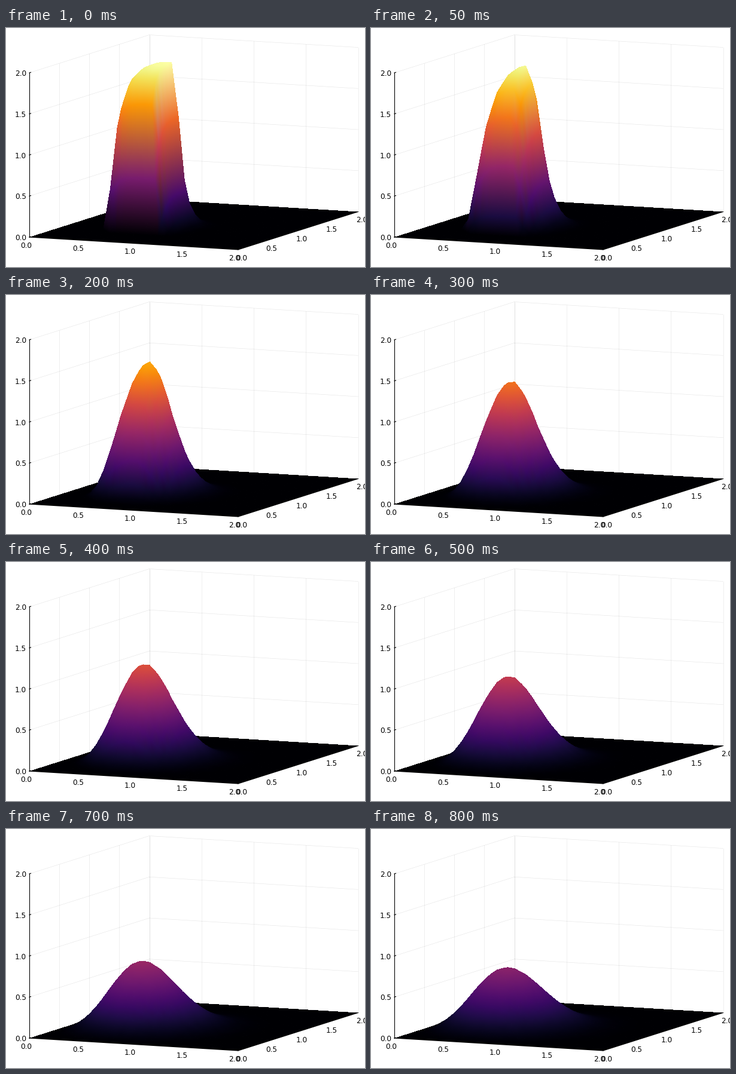
A matplotlib script that plays this animation: 600x400 px, repeating every 0.85 s.

```python
import numpy as np
import matplotlib
import matplotlib.pyplot as plt
from matplotlib.animation import FuncAnimation

W, H, DPI = 600, 400, 100
N = 31                 # grid points per side
FRAMES = 17
SIGMA = 0.25           # diffusion number of one step
PX = 72 / DPI          # one pixel in points

ORIGIN = np.array([39.0, 350.0])
EX = np.array([349.0, 21.0]) / 2
EY = np.array([200.5, -63.5]) / 2
EZ = np.array([0.0, -275.0]) / 2
INFERNO = matplotlib.colormaps["inferno"]
TICKS = np.arange(0, 2.1, 0.5)


def project(x, y, z):
    x, y, z = (np.asarray(a, float)[..., None] for a in (x, y, z))
    return ORIGIN + x * EX + y * EY + z * EZ


def diffuse(u):
    """One in-place sweep, so lower neighbours are already updated."""
    for i in range(1, N - 1):
        for j in range(1, N - 1):
            u[i, j] += SIGMA * (u[i - 1, j] + u[i + 1, j]
                                + u[i, j - 1] + u[i, j + 1] - 4 * u[i, j])


def fill_triangle(img, pts, cols):
    """Paint a triangle with linearly blended vertex colours."""
    (x0, y0), (x1, y1), (x2, y2) = pts
    area = (x1 - x0) * (y2 - y0) - (x2 - x0) * (y1 - y0)
    if abs(area) < 1e-9:
        return
    left, top = np.ceil(pts.min(axis=0) - 0.5).astype(int)
    right, bottom = np.floor(pts.max(axis=0) - 0.5).astype(int)
    if right < left or bottom < top:
        return
    px = np.arange(left, right + 1)[None, :] + 0.5
    py = np.arange(top, bottom + 1)[:, None] + 0.5
    b = ((px - x0) * (y2 - y0) - (x2 - x0) * (py - y0)) / area
    c = ((x1 - x0) * (py - y0) - (px - x0) * (y1 - y0)) / area
    a = 1 - b - c
    inside = (a >= -1e-9) & (b >= -1e-9) & (c >= -1e-9)
    weights = np.stack([a[inside], b[inside], c[inside]], axis=1)
    img[top:bottom + 1, left:right + 1][inside] = weights @ cols


def render(u):
    """Draw the surface from the far corner to the near one."""
    img = np.zeros((H, W, 4))
    grid = np.linspace(0, 2, N)
    x, y = np.meshgrid(grid, grid, indexing="ij")
    pts = project(x, y, u)
    cols = INFERNO(u / 2)
    for j in range(N - 2, -1, -1):
        for i in range(N - 1):
            upper = ([i, i + 1, i + 1], [j + 1, j + 1, j])
            lower = ([i, i + 1, i], [j, j, j + 1])
            for tri in (upper, lower):
                fill_triangle(img, pts[tri], cols[tri])
    return np.clip(img, 0, 1)


def simulate():
    x = np.linspace(0, 2, N)
    block = (x > 0.5) & (x < 0.99)
    u = 2.0 * np.outer(block, block)
    images = []
    for _ in range(FRAMES):
        diffuse(u)
        images.append(render(u))
    return images


fig = plt.figure(figsize=(W / DPI, H / DPI), dpi=DPI, facecolor="white")
ax = fig.add_axes([0, 0, 1, 1])
ax.axis("off")


def line(*corners, **style):
    p = np.array([project(*c) for c in corners])
    ax.plot(p[:, 0], p[:, 1], **style)


def label(x, y, value, **style):
    ax.text(x, y, f"{value:.1f}", fontsize=8.7, family="DejaVu Sans",
            color="black", va="center_baseline", **style)


grid_style = dict(color="black", alpha=0.1, lw=0.6 * PX, zorder=1)
axis_style = dict(color="black", lw=1.1 * PX, zorder=4)

for t in TICKS:
    line((0, t, 0), (0, t, 2), **grid_style)
    line((t, 2, 0), (t, 2, 2), **grid_style)
    line((0, 0, t), (0, 2, t), **grid_style)
    line((0, 2, t), (2, 2, t), **grid_style)

line((0, 0, 0), (2, 0, 0), **axis_style)
line((2, 0, 0), (2, 2, 0), **axis_style)
line((0, 0, 0), (0, 0, 2), **axis_style)

for k, t in enumerate(TICKS):
    line((0, 0, t), (0, 0.025, t), **axis_style)
    label(34, 350 - 68.75 * k, t, ha="right")
    label(33.4 + 87 * k, 362.5 + 5.3 * k, t, ha="center")
    label(394 + 50.1 * k, 384 - 16 * k, t, ha="center")

images = simulate()
surface = ax.imshow(images[0], extent=(0, W, H, 0), interpolation="nearest",
                    aspect="auto", zorder=2)
ax.set_xlim(0, W)
ax.set_ylim(H, 0)


def update(frame):
    surface.set_data(images[frame])
    return (surface,)


anim = FuncAnimation(fig, update, frames=FRAMES, interval=50,
                     repeat=True, repeat_delay=0, blit=False)
plt.show()
```
